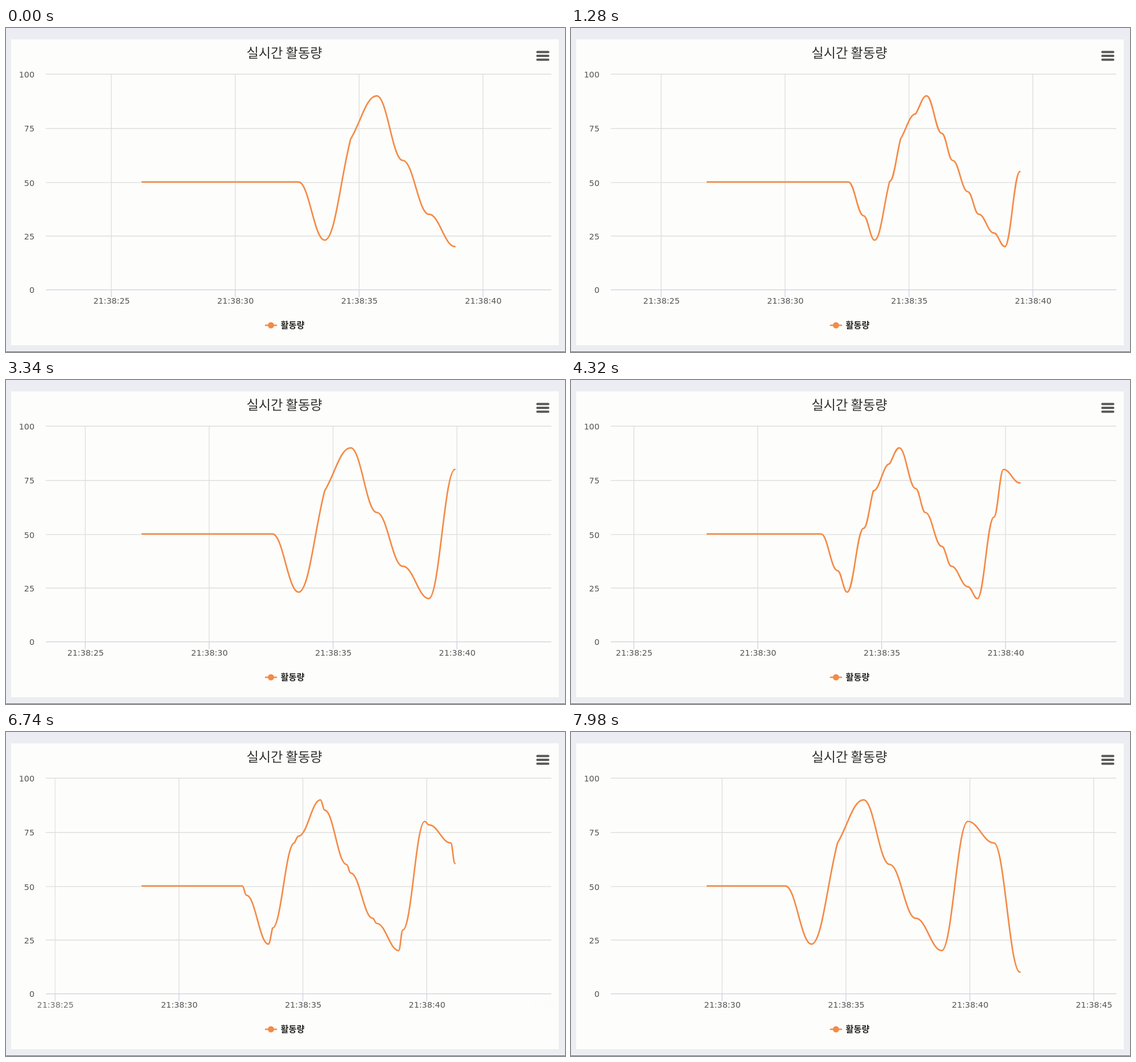
Recreate the animation shown at these times as an HTML page with a canvas. Size 982x570 px, loop 8000 ms.

```html
<!DOCTYPE html>
<html lang="ko">
<head>
<meta charset="utf-8">
<title>실시간 활동량</title>
<style>
html, body { margin: 0; width: 100%; height: 100%; overflow: hidden; background: #ecedf2; }
canvas { display: block; }
</style>
</head>
<body>
<canvas id="stage" width="982" height="570"></canvas>
<script>
const ctx = document.getElementById('stage').getContext('2d');

const LOOP = 8000;
const STEP = 45.78;            // distance between two readings
const LEFT = 239.3, COUNT = 13;
const PLOT = { l: 70, r: 958, t: 81.3, b: 460.6 };
const ROWS = [81.3, 176.8, 271.9, 366, 460.6];
const ORANGE = '#f48b47';
const LABEL = '14.3px "DejaVu Sans", sans-serif';
const KOREAN = '"Noto Sans CJK KR", "Noto Sans CJK", sans-serif';

const values = [50, 50, 50, 50, 50, 50, 50, 23, 70, 90, 60, 35, 20, 80, 70, 10];
const SHARP = 8;               // reading drawn with a corner instead of a plateau
const FIRST = 11.9, PERIOD = 63, LENGTH = 31;   // shifts, counted in ticks

const lerp = (a, b, s) => a + (b - a) * s;
const px = i => LEFT + STEP * i;
const py = v => 460.3 - 3.788 * v;

// The clock advances in an uneven beat: 20, 20, 100 ms.
function ticksAt(ms) {
  const u = ms + 20, r = u % 140;
  return 3 * Math.floor(u / 140) + (r < 20 ? 0 : r < 40 ? 1 : 2);
}

function poseAt(ms) {
  const n = ticksAt(ms) - FIRST;
  if (n < 0) return { k: 0, s: 0 };
  const k = Math.floor(n / PERIOD);
  const t = Math.min(1, (n - k * PERIOD) / LENGTH);
  return t < 1 ? { k, s: 0.5 - Math.cos(Math.PI * t) / 2 } : { k: k + 1, s: 0 };
}

// Bezier numbers of the piece that ends at slot i, after k shifts.
function piece(i, k) {
  const a = values[k + i - 1], b = values[k + i];
  const tangent = (d, y, other) => d === SHARP && k !== 2 ? (1.5 * y + other) / 2.5 : y;
  return [
    px(i - 1) + STEP * 0.4, py(tangent(k + i - 1, a, b)),
    px(i) - STEP * 0.4, py(tangent(k + i, b, a)),
    px(i), py(b)
  ];
}

const dot = (x, v) => [x, py(v), x, py(v), x, py(v)];

function line(x1, y1, x2, y2, color, width) {
  ctx.strokeStyle = color;
  ctx.lineWidth = width;
  ctx.beginPath();
  ctx.moveTo(x1, y1);
  ctx.lineTo(x2, y2);
  ctx.stroke();
}

function text(str, x, y, font, color, align) {
  ctx.font = font;
  ctx.fillStyle = color;
  ctx.textAlign = align;
  ctx.fillText(str, x, y);
}

function drawCurve(k, s) {
  const curve = (from, to) => ctx.bezierCurveTo(...from.map((a, j) => lerp(a, to[j], s)));
  ctx.strokeStyle = ORANGE;
  ctx.lineWidth = 2.7;
  ctx.beginPath();
  ctx.moveTo(LEFT, py(values[k]));
  for (let i = 1; i < COUNT; i++) {
    const v = values[k + i];
    curve(piece(i, k), dot(px(i - 1), v));
    if (s > 0) curve(dot(px(i), v), piece(i, k + 1));
  }
  ctx.stroke();
}

function drawTime(sec, k, s) {
  const x = 185 + (sec - 25) * 43.53 - 45.75 * (k + s);
  let alpha = 1;
  if (sec === 25) alpha = k > 2 ? 0 : k === 2 ? 1 - s : 1;
  if (sec === 45) alpha = k > 2 ? 1 : k === 2 ? Math.max(0, (s - 0.15) / 0.85) : 0;
  if (!alpha) return;
  ctx.globalAlpha = alpha;
  line(x, PLOT.t, x, PLOT.b, '#dedee2', 1.36);
  line(x, PLOT.b, x, PLOT.b + 13, '#ccd3e6', 1.36);
  text('21:38:' + sec, x + 0.5, 485.4, LABEL, '#555', 'center');
  ctx.globalAlpha = 1;
}

function draw(ms) {
  const { k, s } = poseAt(ms);
  ctx.fillStyle = '#ecedf2';
  ctx.fillRect(0, 0, 982, 570);
  ctx.fillStyle = '#6f6c7c';
  ctx.fillRect(0, 569, 982, 1);
  ctx.fillStyle = '#fdfdfb';
  ctx.fillRect(9, 20, 962, 538);

  ctx.save();
  ctx.beginPath();
  ctx.rect(9, 20, 962, 538);
  ctx.clip();
  ctx.lineCap = 'butt';
  ROWS.forEach((y, i) => {
    line(PLOT.l, y, PLOT.r, y, i < 4 ? '#dedede' : '#c8d0e3', 1.36);
    text(100 - 25 * i, 50, y + 5.6, LABEL, '#555', 'right');
  });
  for (let sec = 25; sec <= 45; sec += 5) drawTime(sec, k, s);

  ctx.lineCap = ctx.lineJoin = 'round';
  drawCurve(k, s);
  for (const y of [42.2, 49, 55.8]) line(933.5, y, 952.5, y, '#5a5a5a', 4);

  line(456, 523, 475, 523, ORANGE, 2.7);
  ctx.fillStyle = ORANGE;
  ctx.beginPath();
  ctx.arc(465.5, 523, 5.5, 0, Math.PI * 2);
  ctx.fill();
  text('활동량', 482.5, 528.4, 'bold 15.2px ' + KOREAN, '#262626', 'left');
  text('실시간 활동량', 489, 52.3, '23.2px ' + KOREAN, '#2e2e2e', 'center');
  ctx.restore();
}

let start;
function loop(now) {
  if (start === undefined) start = now;
  draw((now - start) % LOOP);
  requestAnimationFrame(loop);
}
draw(0);
requestAnimationFrame(loop);
</script>
</body>
</html>
```
